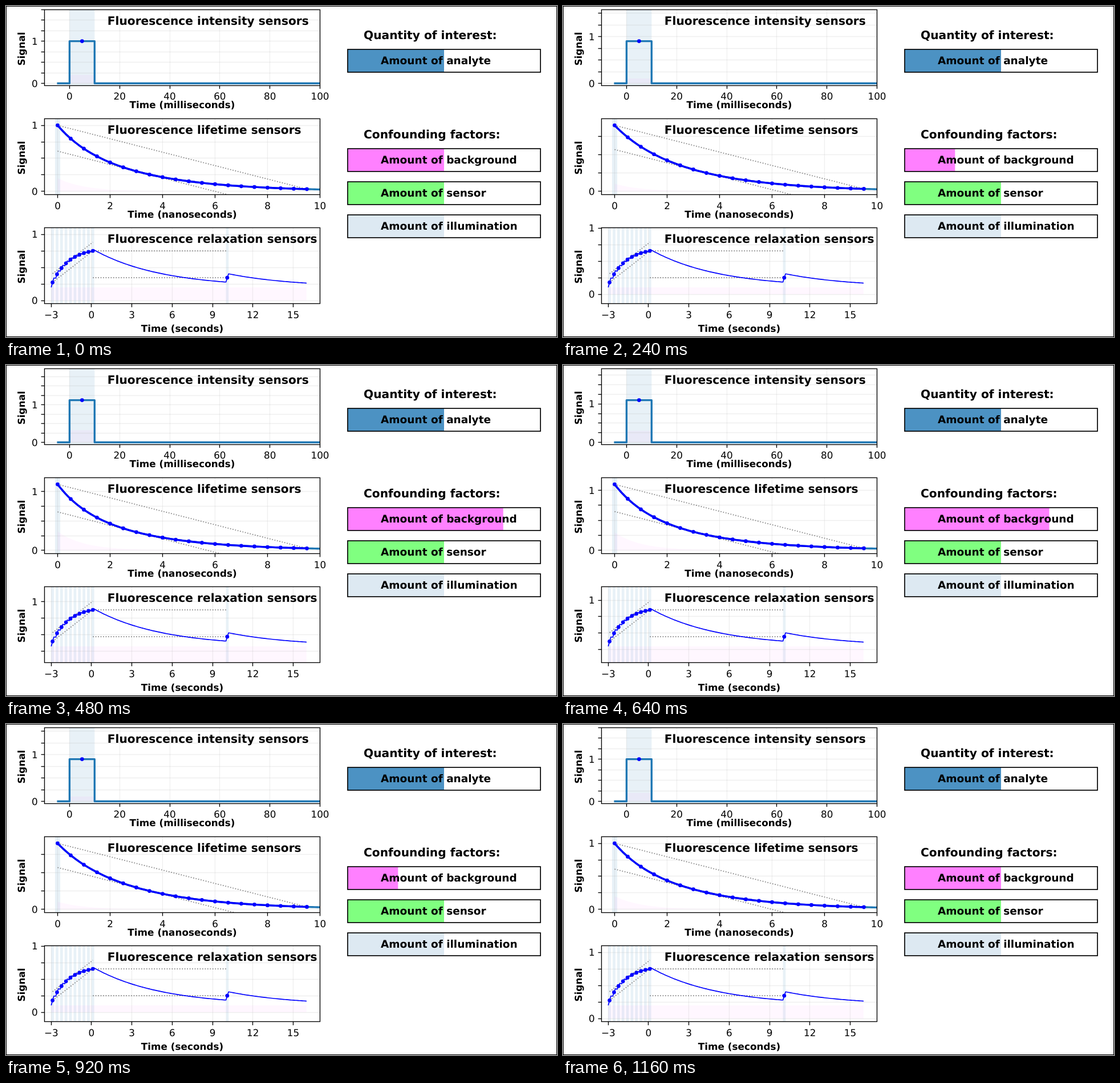
An HTML page with a canvas for the animation above (1.4 s loop, 966x580 px).

```html
<!DOCTYPE html>
<html lang="en">
<head>
<meta charset="utf-8">
<title>Fluorescence sensors</title>
<style>
  html, body { margin: 0; width: 100%; height: 100%; overflow: hidden; background: #fff; }
  canvas { display: block; }
</style>
</head>
<body>
<canvas id="stage" width="966" height="580"></canvas>
<script>
const ctx = document.getElementById('stage').getContext('2d');
const LEFT = 67.5, WIDTH = 483, TOP = 6.2, HEIGHT = 133, PITCH = 191.35;
const SMALL = 16.83, MEDIUM = 18.5, LARGE = 20.2;
const BLUE = '#0000ff', STEEL = '#1f77b4', LIGHT = 'rgba(31,119,180,.1)', PINK = 'rgba(255,0,255,.03)';
const FAMILY = '"DejaVu Sans", sans-serif';
const STEP = 40, LOOP = 1400, SWEEP = 600;

// Fractional glyph advances
ctx.textRendering = 'geometricPrecision';

const range = (n, f) => Array.from({ length: n }, (_, i) => f(i));
const snap = v => Math.floor(v) + 0.5;

function text(str, x, y, size, align = 'left', weight = 'bold') {
  ctx.font = `${weight} ${size}px ${FAMILY}`;
  ctx.fillStyle = '#000';
  ctx.textAlign = align;
  ctx.fillText(str, x, y);
}

function stroke(points, color, width, dash = []) {
  ctx.beginPath();
  points.forEach(([x, y]) => ctx.lineTo(x, y));
  ctx.strokeStyle = color;
  ctx.lineWidth = width;
  ctx.lineJoin = 'round';
  ctx.setLineDash(dash);
  ctx.stroke();
  ctx.setLineDash([]);
}

const dotted = points => stroke(points, '#808080', 1.68, [1.68, 2.78]);

function dots(points) {
  ctx.fillStyle = BLUE;
  for (const [x, y] of points) {
    ctx.beginPath();
    ctx.arc(x, y, 3.37, 0, 7);
    ctx.fill();
  }
}

function area(points, color) {
  ctx.beginPath();
  points.forEach(([x, y]) => ctx.lineTo(x, y));
  ctx.fillStyle = color;
  ctx.fill();
}

// Chord through the end points and its parallel through the farthest point
function chords(points) {
  const [x0, y0] = points[0], [x1, y1] = points[points.length - 1];
  const gaps = points.map(([x, y]) => y - y0 - (y1 - y0) * (x - x0) / (x1 - x0));
  const far = gaps.reduce((a, b) => Math.abs(b) > Math.abs(a) ? b : a);
  for (const d of [0, far]) dotted([[x0, y0 + d], [x1, y1 + d]]);
}

// Relaxation: ten short pulses, a long pause, one more pulse
const pulses = [...range(10, i => -3 + i / 3), 10];
const PULSE = 0.2;
const rise = (s, dt) => 2 / 3 - (2 / 3 - s) * Math.exp(-1.2 * dt);
const fall = (s, dt) => s * Math.exp(-dt / 5);
const relaxCurve = [], relaxDots = [];
let level = 0;
pulses.forEach((start, i) => {
  const end = pulses[i + 1] ?? 16;
  const gap = end - start - PULSE, parts = Math.ceil(gap / 0.1);
  relaxCurve.push([start, level]);
  relaxDots.push([start + PULSE / 2, rise(level, PULSE / 2)]);
  relaxCurve.push(relaxDots[i]);
  level = rise(level, PULSE);
  for (let j = 0; j < parts; j++) {
    const dt = gap * j / parts;
    relaxCurve.push([start + PULSE + dt, fall(level, dt)]);
  }
  level = fall(level, gap);
});
relaxCurve.push([16, level]);

const panels = [
  {
    name: 'intensity', unit: 'milliseconds', x: [-10, 100], first: 0, every: 20, titleDrop: 40.2,
    limits: b => [-0.05 * (0.8 + b), 1.75 * (0.8 + b)],
    spans: [[0, 10]],
    haze: b => [[0, 0], [0, b], [10, b], [10, 0]],
    draw(b, map) {
      const p = 0.8 + b;
      stroke(map([[-5, 0], [0, 0], [0, p], [10, p], [10, 0], [100, 0]]), STEEL, 3.37);
      dots(map([[5, p]]));
    }
  },
  {
    name: 'lifetime', unit: 'nanoseconds', x: [-0.5, 10], first: 0, every: 2, titleDrop: 40.2,
    limits: b => [-0.05 * (0.8 + b), 1.1 * (0.8 + b)],
    spans: [[-0.1, 0.1]],
    haze: b => [[0, 0], ...range(101, i => [i / 10, b * Math.exp(-i / 10)]), [10, 0]],
    draw(b, map) {
      const point = t => [t, 0.8 * Math.exp(-t / 3) + b * Math.exp(-t)];
      const curve = map(range(101, i => point(i / 10)));
      const marks = map(range(20, i => point(i / 2)));
      stroke(curve, STEEL, 3.37);
      chords(marks);
      stroke(curve.slice(0, 96), BLUE, 3.37);
      dots(marks);
    }
  },
  {
    name: 'relaxation', unit: 'seconds', x: [-3.5, 17], first: -3, every: 3, titleDrop: 49.2,
    limits: b => [b - 0.25, b + 0.9],
    spans: pulses.map(s => [s, s + PULSE]),
    haze: b => [[-3, 0], [-3, b], [16, b], [16, 0]],
    draw(b, map) {
      const lift = points => map(points.map(([t, s]) => [t, s + b]));
      const marks = lift(relaxDots), [last, late] = marks.slice(9);
      chords(marks.slice(0, 10));
      for (const y of [last[1], late[1]]) dotted([[last[0], y], [late[0], y]]);
      stroke(lift(relaxCurve), BLUE, 1.68);
      dots(marks);
    }
  }
];

function drawPanel(panel, row, b) {
  const { x: [x0, x1] } = panel, [lo, hi] = panel.limits(b);
  const top = TOP + row * PITCH, bottom = top + HEIGHT, right = LEFT + WIDTH;
  const px = x => LEFT + (x - x0) / (x1 - x0) * WIDTH;
  const py = y => bottom - (y - lo) / (hi - lo) * HEIGHT;
  const map = points => points.map(([x, y]) => [px(x), py(y)]);
  const xTicks = range(Math.floor((x1 - panel.first) / panel.every) + 1, i => panel.first + i * panel.every);
  const yTicks = range(13, i => i / 4).filter(v => v >= lo && v <= hi + 1e-6);

  ctx.save();
  ctx.beginPath();
  ctx.rect(LEFT, top, WIDTH, HEIGHT);
  ctx.clip();
  ctx.fillStyle = LIGHT;
  for (const [a, z] of panel.spans) ctx.fillRect(px(a), top, px(z) - px(a), HEIGHT);
  area(map(panel.haze(b)), PINK);
  const grid = 'rgba(176,176,176,.2)';
  for (const v of xTicks) stroke([[snap(px(v)), top], [snap(px(v)), bottom]], grid, 1.35);
  for (const v of yTicks) stroke([[LEFT, snap(py(v))], [right, snap(py(v))]], grid, 1.35);
  panel.draw(b, map);
  ctx.restore();

  for (const v of xTicks) {
    const x = snap(px(v));
    stroke([[x, bottom], [x, bottom + 5.9]], '#000', 1.35);
    text(String(v).replace('-', '\u2212'), px(v), Math.round(bottom + 25), SMALL, 'center', 'normal');
  }
  for (const v of yTicks) {
    const y = snap(py(v));
    stroke([[LEFT - 5.9, y], [LEFT, y]], '#000', 1.35);
    if (v === 0 || v === 1) text(String(v), 55.7, Math.round(py(v) + 6), SMALL, 'right', 'normal');
  }
  ctx.strokeStyle = '#000';
  ctx.lineWidth = 1.35;
  ctx.lineJoin = 'miter';
  ctx.strokeRect(LEFT, snap(top), WIDTH, snap(bottom) - snap(top));

  text(`Fluorescence ${panel.name} sensors`, 177.7, Math.round(top + 26.5), LARGE);
  text(`Time (${panel.unit})`, 309, Math.round(bottom + panel.titleDrop), SMALL, 'center');
  ctx.save();
  ctx.translate(33, Math.round(top + 68.3));
  ctx.rotate(-Math.PI / 2);
  text('Signal', 0, 0, SMALL, 'center');
  ctx.restore();
}

function drawBar(label, y, color, amount) {
  ctx.fillStyle = color;
  ctx.fillRect(599, y, 338 * amount, 40);
  ctx.strokeStyle = '#000';
  ctx.lineWidth = 1.68;
  ctx.lineJoin = 'miter';
  ctx.strokeRect(599, y, 338, 40);
  text('Amount of ' + label, 657, y + 26, MEDIUM);
}

// Background amount: half, high, low, high, half
const keys = [[0, 0.5], [3, 0.875], [14, 0.125], [25, 0.875], [28, 0.5]];
function amountAt(time) {
  const step = Math.min(14, Math.floor((time < SWEEP ? time : time - SWEEP) / STEP));
  const pos = step * 2;
  const i = Math.max(1, keys.findIndex(k => pos <= k[0]));
  const [a, va] = keys[i - 1], [z, vz] = keys[i];
  return va + (vz - va) * (pos - a) / (z - a);
}

function render(time) {
  const amount = amountAt(time);
  ctx.fillStyle = '#fff';
  ctx.fillRect(0, 0, 966, 580);
  panels.forEach((panel, row) => drawPanel(panel, row, 0.4 * amount));
  text('Quantity of interest:', 627, 58, LARGE);
  text('Confounding factors:', 627, 232, LARGE);
  drawBar('analyte', 76, '#4c92c3', 0.5);
  drawBar('background', 250, '#ff80ff', amount);
  drawBar('sensor', 308, '#80ff80', 0.5);
  drawBar('illumination', 366, '#dde9f2', 0.5);
  ctx.strokeStyle = '#000';
  ctx.lineWidth = 1;
  ctx.strokeRect(0.5, 0.5, 965, 579);
}

const begin = performance.now();
function tick() {
  render((performance.now() - begin) % LOOP);
  requestAnimationFrame(tick);
}
tick();
</script>
</body>
</html>
```
